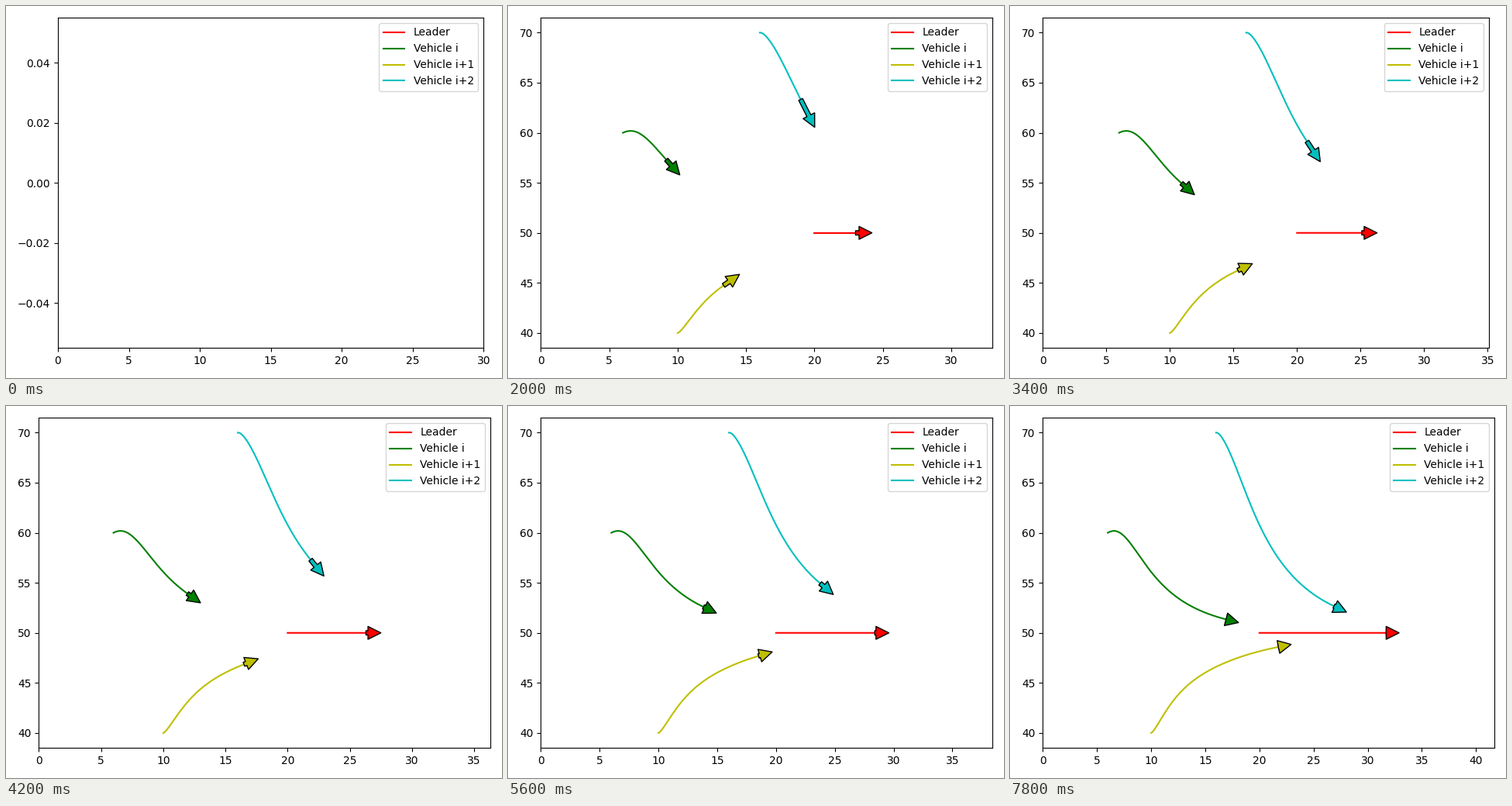
Write a matplotlib script that moves like this. It is 640 by 480 pixels and loops after 8 s.

```python
import numpy as np
import matplotlib.pyplot as plt
from matplotlib.animation import FuncAnimation

FRAMES, INTERVAL = 40, 200
STEP = 0.3             # simulated seconds per frame
SUB = 100              # integration steps per frame
PULL, DAMP = 1 / 6, 1  # coupling of positions and of velocities
REACH = 1.2            # arrow length per unit of velocity

NAMES = ["Leader", "Vehicle i", "Vehicle i+1", "Vehicle i+2"]
COLORS = "rgyc"
START = np.array([[20, 50], [6, 60], [10, 40], [16, 70]], float)
SPEED = np.array([[1, 0], [2.25, 1.4], [1.1, 0.5], [1.15, 0.2]])
SLOT = np.array([[0, 0], [-15, 0], [-10, 0], [-5, 0]])


def simulate():
    """Every follower is drawn to the others' formation slots; the leader cruises."""
    pos, vel = START.copy(), SPEED.copy()
    dt = STEP / SUB
    track, speeds = [], []
    for _ in range((FRAMES - 1) * SUB + 1):
        track.append(pos)
        speeds.append(vel)
        err = pos - SLOT
        acc = -len(pos) * (PULL * (err - err.mean(0)) + DAMP * (vel - vel.mean(0)))
        acc[0] = 0
        pos, vel = pos + dt * vel + dt * dt / 2 * acc, vel + dt * acc
    return np.array(track), np.array(speeds)


track, speeds = simulate()

fig, ax = plt.subplots(figsize=(6.4, 4.8), dpi=100)
trails, arrows = [], []
for name, color in zip(NAMES, COLORS):
    trails.append(ax.plot([], [], color, label=name)[0])
    arrows.append(ax.annotate("", xy=(0, 0), xytext=(0, 0),
                              arrowprops=dict(facecolor=color)))
ax.legend(loc="upper right")


def update(k):
    now = k * SUB
    shown = track[:now + 1] if k else track[:0]
    for i, (trail, arrow) in enumerate(zip(trails, arrows)):
        trail.set_data(shown[:, i, 0], shown[:, i, 1])
        arrow.set_visible(k > 0)
        arrow.xyann = tuple(track[now, i])
        arrow.xy = tuple(track[now, i] + REACH * speeds[now, i])
    ax.set_xlim(0, 30 + k * STEP)
    ax.relim()
    ax.autoscale_view(scalex=False)
    fig.tight_layout()
    return trails + arrows


anim = FuncAnimation(fig, update, frames=FRAMES, interval=INTERVAL,
                     init_func=lambda: update(0), repeat=True, repeat_delay=0)
plt.show()
```
